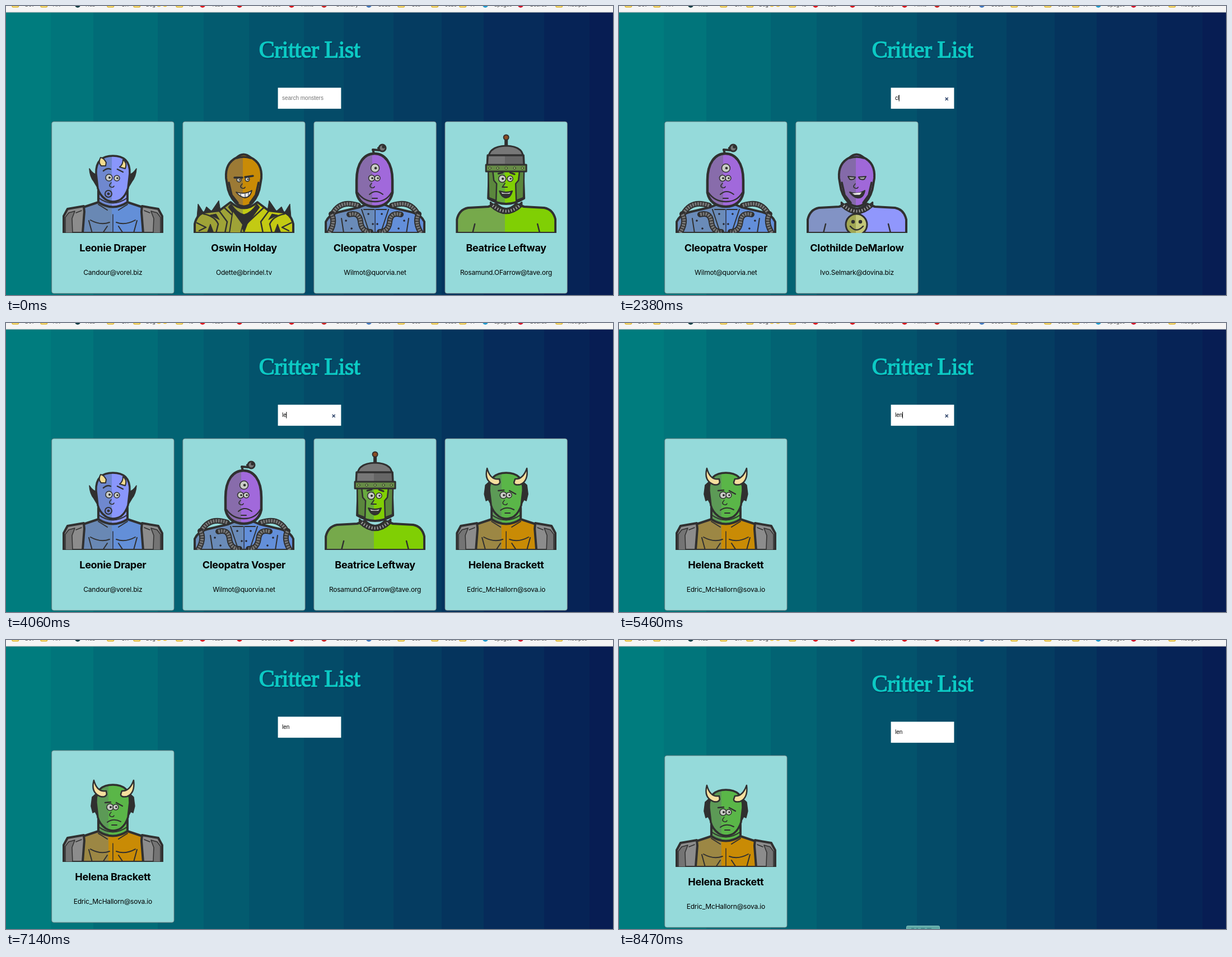
These frames come from a looping animation (1084x517 px, 8540 ms). An HTML page:

```html
<!DOCTYPE html>
<html lang="en">
<head>
<meta charset="utf-8">
<title>Critter List</title>
<style>
  html, body { margin: 0; width: 100%; height: 100%; overflow: hidden; }
  svg { display: block; }
  .title { font: 42px "Liberation Serif", serif; letter-spacing: -.4px; text-anchor: middle; }
  .name { font: 700 18px Inter, sans-serif; text-anchor: middle; letter-spacing: -.3px; }
  .mail { font: 12px Inter, sans-serif; text-anchor: middle; letter-spacing: -.2px; }
  .field { font: 10px "Liberation Sans", sans-serif; }
  .bookmark { font: 9px Inter, sans-serif; fill: #444; }
  .art { stroke: #303030; stroke-linejoin: round; stroke-linecap: round; }
</style>
</head>
<body>
<svg id="stage" width="1084" height="517" viewBox="0 0 1084 517">
  <defs id="defs"></defs>
  <g id="backdrop"></g>
  <g id="page">
    <text class="title" x="543" y="94" fill="#063f5c" stroke="#063f5c" stroke-width="2">Critter List</text>
    <text class="title" x="542" y="92" fill="#0ccac4" stroke="#0ccac4" stroke-width="1.4">Critter List</text>
    <rect x="485.6" y="146.2" width="112.8" height="37.6" fill="#fff"/>
    <text id="query" class="field" x="493" y="168"></text>
    <path id="caret" d="M0 159V170.5" stroke="#000"/>
    <path id="clear" d="M582.7 163.7l5 5m0-5l-5 5" stroke="#2b4168" stroke-width="1.6"/>
    <g id="cards"></g>
  </g>
  <g id="toolbar"></g>
  <g id="hint">
    <rect x="513.5" y=".5" width="59" height="14" rx="2" fill="#5fa9a6" stroke="#89c5c1"/>
    <path d="M522 5h5m4 0h3m5 0h7m4 0h8" stroke="#2d6f78"/>
  </g>
</svg>
<script>
const $ = id => document.getElementById(id);
const LOOP = 8540, STEP = 70, INK = '#303030';

// --- drawing helpers ---
let defs = '', toneCount = 0;
const tone = (left, right, x = 88) => {
  const id = 'tone' + toneCount++;
  defs += `<linearGradient id="${id}" gradientUnits="userSpaceOnUse" x1="0" x2="180">
    <stop offset="${x / 180}" stop-color="${left}"/><stop offset="${x / 180}" stop-color="${right}"/></linearGradient>`;
  return `url(#${id})`;
};
const shape = (d, fill = 'none', width = 2.5) => `<path d="${d}" fill="${fill}" stroke-width="${width}"/>`;
const disc = (x, y, r, fill, width = 1.5) =>
  `<circle cx="${x}" cy="${y}" r="${r}" fill="${fill}" stroke-width="${width}"/>`;
const ribbed = (d, color, width, dash) =>
  `<path d="${d}" fill="none" stroke="${color}" stroke-width="${width}" stroke-dasharray="${dash}" stroke-linecap="butt"/>`;
const both = s => s + `<g transform="matrix(-1 0 0 1 180 0)">${s}</g>`;
const eye = (x, y, r) => disc(x, y, r, '#c9ccc6') + disc(x + 1, y, r / 4, INK, 1);
const nose = (x, y) => shape(`M${x} ${y}q-6 6 0 8q4 1 5-2`, 'none', 1.6);

// --- bodies ---
const plated = skin =>
  shape('M35 180L37 134 64 125Q90 139 116 125L143 134 145 180Z', skin, 4) +
  both(shape('M2 180V150L9 137 38 132 39 142 36 180Z', '#8c8c8c', 4) +
    shape('M5 152L11 144 22 141 17 154 18 180H5Z', '#747474', 1.5) + shape('M24 144L34 140', 'none', 1.5) +
    shape('M50 157Q68 167 84 161M72 180L80 168M53 180L47 158M64 129L80 139', 'none', 2)) +
  shape('M90 147V180', 'none', 1.5);

const spiky = skin =>
  both(shape('M6 152L8 128 18 144 23 133 32 141 45 122 48 140Z', INK, 1)) +
  shape('M2 180V164Q6 146 20 143L46 140 66 125Q90 146 114 125L134 140 160 143Q174 146 178 164V180Z', skin, 4) +
  both(shape('M46 141L60 160 56 180M54 134L84 162M18 146Q38 150 44 164L40 180M6 162L22 170 10 176', 'none', 2.5) +
    shape('M30 148L40 146 46 156ZM24 180L30 164 36 180Z', INK, 1)) +
  shape('M67 128Q78 144 90 147Q102 144 113 128L118 134 96 164 90 180 85 164 62 134Z', INK, 1) +
  shape('M70 140L88 165 84 180H64Z', skin, 2);

const piped = skin =>
  shape('M2 180V160Q8 147 24 143L62 134 74 129H106L118 134 156 143Q172 147 178 160V180Z', skin, 4) +
  both(['M14 146Q28 120 60 131', 'M44 147Q62 142 64 160T82 178', 'M8 180Q20 160 12 146']
    .map(d => shape(d, 'none', 10) + ribbed(d, '#777', 6, '3 1.6')).join('') +
    shape('M66 138L80 180M30 154L34 180M70 138H88', 'none', 2) +
    [[38, 158], [48, 172], [78, 146], [86, 164]].map(([x, y]) => disc(x, y, 1.5, '#223', .5)).join('')) +
  shape('M90 138V180', 'none', 1.5);

const sweater = skin =>
  shape('M2 180V156Q6 138 22 135L58 133 72 128Q90 146 108 128L122 133 158 135Q174 138 178 156V180Z', skin, 4) +
  both(shape('M30 180L34 164', 'none', 2.5)) +
  shape('M62 125Q90 152 118 125L118 132Q90 158 62 132Z', INK) + ribbed('M66 131Q90 151 114 131', '#999', 5, '2 3');

// --- heads ---
const skull = skin =>
  shape('M64 104V125Q90 142 116 125V104Z', skin, 4) + shape('M64 117Q90 136 116 117', 'none', 2) +
  shape('M60 74C59 51 71 42 90 42S121 51 120 74L117 100Q113 113 104 120Q90 128 77 120Q66 112 63 100Z', skin, 3.5);
const dome = skin =>
  shape('M58 82Q56 55 77 45Q89 34 102 45Q123 55 121 82L119 94Q117 112 105 126Q90 139 75 126Q62 112 60 94Z', skin, 4) +
  shape('M77 46Q89 42 102 46M63 90L68 112 79 126M116 90L111 112 101 126', 'none', 3.5);

const imp = () =>
  plated(tone('#6988b4', '#638fd8')) +
  both(shape('M63 76Q55 76 48 65Q49 80 56 88L62 98Z', INK, 1.5)) + skull(tone('#6f88cf', '#8996fb')) +
  shape('M69 60Q63 54 68 45Q74 46 78 54L77 60Z', '#f3dc8f', 2) + shape('M102 62Q108 58 108 49Q116 54 112 65Z', '#f3dc8f', 2) +
  eye(83, 81, 6) + eye(97, 82, 5) + shape('M73 69Q80 63 86 66M98 66L108 71', 'none', 2.5) + nose(87, 90) +
  disc(82, 110, 6, '#7183d5', 2) + disc(82, 110, 2, INK, 1);

const brute = () =>
  spiky(tone('#9fa337', '#c3ca13')) + dome(tone('#9c7a35', '#c98b06')) +
  eye(81, 85, 3.8) + eye(96, 84, 3.8) + shape('M73 81L87 81M92 80L106 78', 'none', 3.5) + nose(87, 92) +
  shape('M76 107Q92 112 104 104Q101 117 91 117Q82 115 76 107Z', '#eee', 1.8) + shape('M84 110V115M92 110V117M98 108V115', 'none', 1);

const cyclops = () =>
  piped(tone('#6a8bb8', '#638fda')) + shape('M88 38L86 31 98 32 96 28', 'none', 4) + disc(103, 28, 6, '#777', 3) + disc(105, 26, 2, INK) +
  shape('M57 86C57 54 71 38 89 38S121 54 121 86V108Q116 132 90 133Q62 132 57 108Z', tone('#886cab', '#a169db', 85), 4.5) +
  shape('M59 108Q70 124 90 124T119 108', 'none', 2.5) +
  eye(90, 64, 7.5) + eye(84, 82, 5.5) + eye(94, 82, 5) + nose(84, 91) +
  shape('M80 111Q91 101 104 111M85 118H94', 'none', 2);

const knight = () =>
  sweater(tone('#76a94b', '#80cf04')) +
  shape('M90 26V14', 'none', 6) + disc(90, 9, 4.5, '#8c4d22', 2) +
  shape('M59 42Q62 25 90 24Q118 25 120 42Z', '#777', 3) + shape('M57 41H121L122 60H56Z', tone('#777', '#666'), 3.5) +
  shape('M60 62H120L122 118Q106 128 90 128Q74 128 58 118Z', tone('#68a93f', '#80cf04'), 4) +
  both(shape('M58 68H66L68 86 73 92 72 122 59 117Z', '#5b873d', 2.5)) +
  shape('M54 58H126V70H54Z', '#668b46', 3) +
  [61, 75, 90, 105, 119].map(x => disc(x, 64, 2, '#a4cc68', 1)).join('') +
  eye(83, 83, 6.5) + eye(97, 83, 5) + shape('M76 74L84 72M97 72L105 75', 'none', 3) + shape('M88 91L83 98H92', 'none', 1.8) +
  shape('M78 105Q90 109 101 105Q97 119 88 117Q81 115 78 105Z', '#333', 2) + shape('M81 107Q90 110 98 107L96 110H83Z', '#eee', .5);

const bull = () =>
  plated(tone('#9c8744', '#c98b05', 82)) +
  both(shape('M62 56L53 64 51 80 54 92 58 90 65 103Z', INK, 1.5)) + skull(tone('#5c9a56', '#5ab648', 82)) +
  shape('M56 34Q50 56 68 63Q77 65 79 59L78 53Q62 56 56 34Z', '#f5df9f', 2.5) +
  shape('M127 34Q130 57 115 63Q104 65 104 59L106 53Q120 54 127 34Z', '#f5df9f', 2.5) +
  eye(85, 82, 6) + eye(95, 82, 5) + shape('M76 74L86 73M96 74L107 80', 'none', 2.5) + nose(87, 91) +
  shape('M80 109Q91 101 104 108M88 114H97', 'none', 2);

const rogue = () =>
  sweater(tone('#8293c5', '#9097fc')) + dome(tone('#846aa9', '#a068d9')) +
  disc(89, 165, 19, tone('#a0a653', '#c2c779'), 3) + disc(83, 160, 2.5, INK) + disc(96, 160, 2.5, INK) + shape('M78 168Q89 181 101 168', 'none', 2.5) +
  both(shape('M74 79L87 80Q85 86 77 84Z', '#aaa', 2)) + nose(87, 92) +
  shape('M77 107Q92 112 104 104Q101 119 90 117Q82 115 77 107Z', '#333', 2) + shape('M81 109L99 107 95 112H86Z', '#eee', .5);

const monsters = [
  ['Leonie Draper', 'Candour@vorel.biz', imp()],
  ['Oswin Holday', 'Odette@brindel.tv', brute()],
  ['Cleopatra Vosper', 'Wilmot@quorvia.net', cyclops()],
  ['Beatrice Leftway', 'Rosamund.OFarrow@tave.org', knight()],
  ['Helena Brackett', 'Edric_McHallorn@sova.io', bull()],
  ['Clothilde DeMarlow', 'Ivo.Selmark@dovina.biz', rogue()],
];
$('defs').innerHTML = defs;

// Four columns with 15px gaps across 85% of the stage.
const CARD = { x: 81.3, y: 206.5, width: 219.1, height: 308, gap: 15 };
const center = CARD.width / 2;
const card = ([name, mail, art], i) => `<g transform="translate(${CARD.x + (CARD.width + CARD.gap) * i} ${CARD.y})"><g class="card">
  <rect x=".4" y=".4" width="${CARD.width - .8}" height="${CARD.height - .8}" rx="3.6" fill="#95dada" stroke="#808080" stroke-width=".8"/>
  <svg class="art" x="19.6" y="19.5" width="180" height="180">${art}</svg>
  <text class="name" x="${center}" y="232.3">${name}</text>
  <text class="mail" x="${center}" y="274.3">${mail}</text></g></g>`;

// --- fixed scenery ---
const bands = [0, 80, 156, 271, 353, 434, 532, 603, 692, 778, 853, 961, 1042, 1084];
const mix = (a, b, p) => a + (b - a) * p;
$('backdrop').innerHTML = bands.slice(1).map((end, i) => {
  const p = (bands[i] + end) / 2 / 1084;
  return `<rect x="${bands[i]}" width="${end - bands[i]}" height="517" shape-rendering="crispEdges"
    fill="rgb(${mix(0, 7, p)},${mix(128, 27, p)},${mix(128, 82, p)})"/>`;
}).join('');

const folders = [11, 62, 181, 228, 304, 700, 760, 810, 982];
const sites = [[128, '#123c43'], [351, '#e1181f'], [417, '#d9141b'], [510, '#d9141b'], [568, '#c22'], [648, '#4078c0'], [856, '#1f9bcf'], [919, '#d3152b']];
const labels = [[34, 'Dev'], [84, 'Art'], [142, 'Hub'], [206, 'UX'], [250, 'Dsg'], [327, 'Io'], [367, 'Tube'], [455, 'Courses'],
  [527, 'Films'], [590, 'Directory'], [664, 'Code'], [724, 'Css'], [784, 'Jobs'], [830, 'A'], [872, 'Epages'], [936, 'Boards'], [1004, 'Recipes']];
$('toolbar').innerHTML = '<rect width="1084" height="11" fill="#f5f5f5"/><path d="M0 11.2H1084" stroke="#b9bdbd"/>' +
  folders.map(x => `<rect x="${x}" y="-8" width="11.5" height="10" rx="2" fill="#fbe38a" stroke="#dfb62e" stroke-width="1.6"/>`).join('') +
  sites.map(([x, color]) => `<circle cx="${x}" cy="-2" r="5" fill="${color}"/>`).join('') +
  [273, 284].map(x => `<circle cx="${x}" cy="-3" r="4.5" fill="#f2c230"/>`).join('') +
  labels.map(([x, label]) => `<text class="bookmark" x="${x}" y=".8">${label}</text>`).join('');

// --- timeline: start, typed text, caret visible ---
const typing = [
  [0, '', 0], [420, '', 1], [910, '', 0], [1470, '', 1], [1960, '', 0],
  [2170, 'c', 1], [2380, 'cl', 1], [2520, 'cle', 1], [3080, 'cle', 0], [3360, 'cl', 0],
  [3570, 'c', 1], [3710, '', 1], [3850, 'l', 1], [4060, 'le', 1], [4550, 'le', 0],
  [5040, 'le', 1], [5460, 'len', 1], [5950, 'len', 0],
];
const ramp = (t, start, length) => Math.min(1, Math.max(0, (t - start) / length));
const easeOut = p => 1 - (1 - p) ** 2;
const bounce = (t, start, length) => 9 * Math.sin(Math.PI * ramp(t, start, length));

let shown = null;
function search(text) {
  if (text === shown) return;
  shown = text;
  $('query').textContent = text || 'search monsters';
  $('query').setAttribute('fill', text ? '#000' : '#757575');
  $('cards').innerHTML = monsters.filter(([name]) => name.toLowerCase().includes(text)).slice(0, 4).map(card).join('');
  const x = text ? 493 + $('query').getComputedTextLength() : 493;
  $('caret').setAttribute('transform', `translate(${x.toFixed(1)} 0)`);
}
const show = (id, on) => $(id).setAttribute('visibility', on ? 'visible' : 'hidden');

function draw() {
  const t = Math.floor(performance.now() % LOOP / STEP) * STEP;
  const [, text, caret] = typing.findLast(([start]) => t >= start);
  search(text);
  show('caret', caret);
  show('clear', text && t < 6510);

  const hover = easeOut(ramp(t, 5900, 280)) - easeOut(ramp(t, 6880, 280));
  document.querySelector('.card').setAttribute('transform',
    `translate(${center} ${CARD.height / 2}) scale(${1 + .05 * hover}) translate(${-center} ${-CARD.height / 2})`);
  const scroll = bounce(t, 6860, 560) + bounce(t, 7700, 490);
  $('page').setAttribute('transform', `translate(0 ${-Math.round(scroll)})`);

  show('hint', t >= 8400);
  $('hint').setAttribute('transform', `translate(0 ${t < 8470 ? 514 : 511})`);
  requestAnimationFrame(draw);
}
draw();
</script>
</body>
</html>
```
